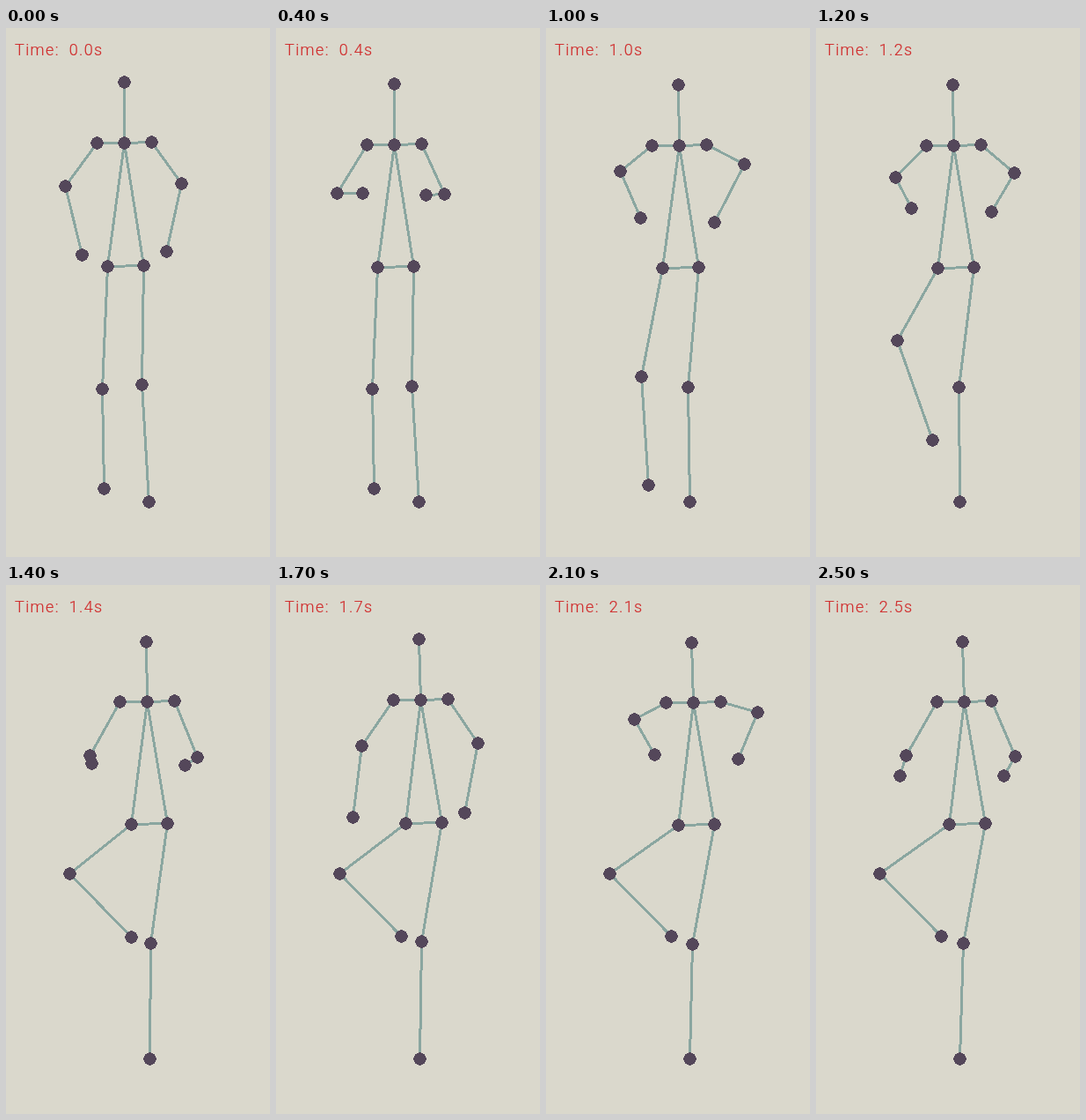
These frames come from a looping animation (300x600 px, 2600 ms). An HTML page:

```html
<!DOCTYPE html>
<html lang="en">
<head>
<meta charset="utf-8">
<title>Stick figure</title>
<style>
  html, body { margin: 0; width: 100%; height: 100%; overflow: hidden; background: #dad8cc; }
  svg { display: block; width: 100%; height: 100%; }
  line, circle { shape-rendering: crispEdges; }
  line { stroke: #8aa6a0; stroke-width: 3; }
  circle { fill: #54475a; }
  text {
    fill: #d02c2c; stroke: #d02c2c; stroke-width: .2;
    font: 300 18px Roboto, "Open Sans", sans-serif;
    letter-spacing: 1.4px; word-spacing: 5px;
  }
</style>
</head>
<body>
<svg viewBox="0 0 300 600">
  <text id="label" x="10" y="30.5">Time: 0.0s</text>
  <g id="bones" transform="translate(.5 .5)"></g>
  <g id="joints" transform="translate(.5 .5)"></g>
</svg>
<script>
const STEP = 100, STEPS = 26;

// Arm poses as [elbow x, elbow y, wrist x, wrist y] from each shoulder.
// As the body sways, wrists shift sideways by `spread` and down by `drop`;
// `bob` is how far the body sinks.
const hang = {
  left: [-36, 49, -17, 127], right: [34, 47, 17, 124],
  spread: [-33, 2], drop: 7, bob: 0
};
const raised = {
  left: [-36, 38, -12, 103], right: [43, 31, -8, 109],
  spread: [0, 30], drop: -46, bob: 3.5
};
const folded = {
  left: [-34, 54, -4, 54], right: [26, 57, 5, 57],
  spread: [-36, 9], drop: 20, bob: 2.5
};
const cycle = [hang, raised, folded];

const clamp = u => Math.min(1, Math.max(0, u));
const mix = (a, b, u) => a + (b - a) * u;
const smooth = u => u * u * (3 - 2 * u);
const smoother = u => u * u * u * (u * (6 * u - 15) + 10);

// Weight shift to the standing leg: quick at first, then settling.
const sway = t => 1 - Math.exp(-((Math.max(0, t - .35) / .8) ** 1.5));

// Two quick beats to start, then three per second.
const beatAt = t => t < .4 ? t * 5 : 2 + (t - .4) * 3;

function armOffsets(pose, side, shift) {
  const [ex, ey, wx, wy] = pose[side];
  const spread = pose.spread[side === "left" ? 0 : 1];
  return [ex, ey + .45 * pose.drop * shift, wx + spread * shift, wy + pose.drop * shift];
}

function poseAt(t) {
  const shift = sway(t), hipShift = sway(t - .07);
  const lift = smooth(clamp((t - .85) / .57)), late = lift * lift;
  const beat = beatAt(t), index = Math.floor(beat);
  const from = cycle[index % 3], to = cycle[(index + 1) % 3];
  const blend = smoother(beat - index);
  const bob = mix(from.bob, to.bob, blend);

  const neck = [133.5 + 34.5 * shift, 129.5 + bob];
  const near = (dx, dy, base = neck) => [base[0] + dx, base[1] + dy];
  const hipL = [114.5 + 37.5 * hipShift, 269.5 + .75 * bob];
  const joints = {
    neck, hipL,
    head: near(-2 * shift, shift - 69),
    shoulderL: near(-31, .4),
    shoulderR: near(31, -.8),
    hipR: near(41, -1, hipL),
    kneeL: [109 - 37 * late, 409 - 82 * lift],
    ankleL: [111 + 31 * lift, 522 - 124 * late],
    kneeR: [153.5 + 13.5 * shift, 404 + .9 * bob],
    ankleR: [162 + shift, 537]
  };

  for (const side of ["left", "right"]) {
    const end = side[0].toUpperCase();
    const a = armOffsets(from, side, shift), b = armOffsets(to, side, shift);
    const [ex, ey, wx, wy] = a.map((value, i) => mix(value, b[i], blend));
    const shoulder = joints["shoulder" + end];
    joints["elbow" + end] = near(ex, ey, shoulder);
    joints["wrist" + end] = near(wx, wy, shoulder);
  }
  return joints;
}

const links = [["neck", "head"], ["hipL", "hipR"]];
for (const end of "LR") {
  const arm = ["neck", "shoulder" + end, "elbow" + end, "wrist" + end];
  const leg = ["neck", "hip" + end, "knee" + end, "ankle" + end];
  for (const limb of [arm, leg])
    for (let i = 0; i < 3; i++) links.push([limb[i], limb[i + 1]]);
}

const byId = id => document.getElementById(id);
function setAttrs(el, attrs) {
  for (const key in attrs) el.setAttribute(key, attrs[key]);
  return el;
}
function add(parent, tag, attrs = {}) {
  const el = document.createElementNS("http://www.w3.org/2000/svg", tag);
  return parent.appendChild(setAttrs(el, attrs));
}

const label = byId("label");
const bones = links.map(() => add(byId("bones"), "line"));
const dots = {};
for (const name in poseAt(0)) dots[name] = add(byId("joints"), "circle", { r: 7.3 });

function draw(step) {
  const t = step * STEP / 1000;
  const joints = poseAt(t);
  for (const name in joints) {
    const [cx, cy] = joints[name] = joints[name].map(Math.round);
    setAttrs(dots[name], { cx, cy });
  }
  links.forEach(([from, to], i) => {
    const [x1, y1] = joints[from], [x2, y2] = joints[to];
    setAttrs(bones[i], { x1, y1, x2, y2 });
  });
  label.textContent = `Time: ${t.toFixed(1)}s`;
}

const start = performance.now();
function tick() {
  const elapsed = Math.max(0, performance.now() - start);
  draw(Math.floor(elapsed / STEP) % STEPS);
  requestAnimationFrame(tick);
}
draw(0);
requestAnimationFrame(tick);
</script>
</body>
</html>
```
